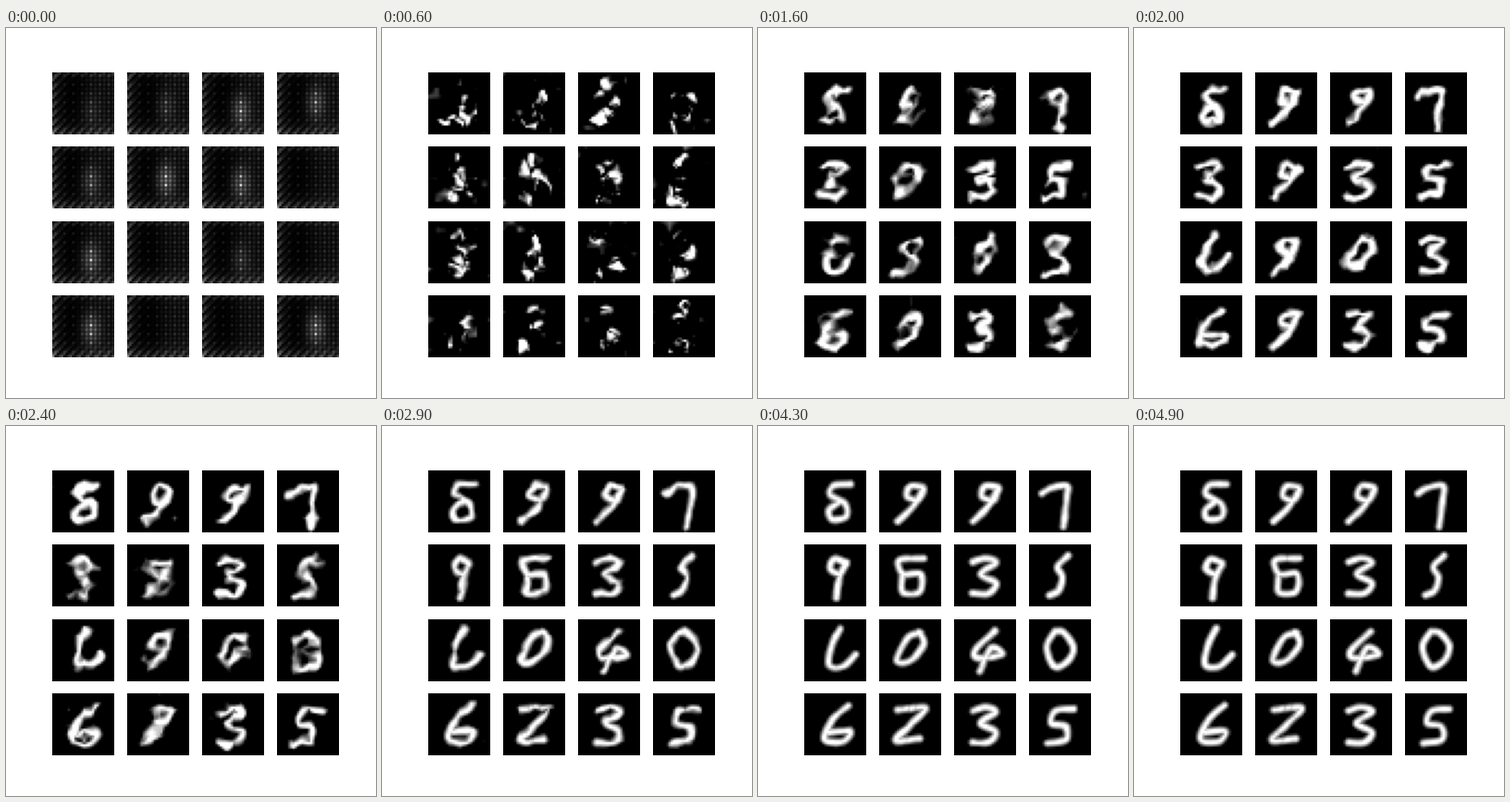
Animation of 400x400 px, one loop 5100 ms. Source, as a matplotlib script:

```python
import numpy as np
import matplotlib.pyplot as plt
from matplotlib.animation import FuncAnimation

SIZE, CELL = 28, 67
FRAMES, LAST = 51, 49
Y, X = np.mgrid[0:SIZE, 0:SIZE]
PX, PY = (X + 0.5) * CELL / SIZE, (Y + 0.5) * CELL / SIZE

# Key points of each handwritten form, joined by a smooth curve.
GLYPHS = {
    "0": [(28, 13), (19, 30), (28, 51), (42, 45), (48, 30), (38, 15), (28, 13)],
    "1": [(42, 12), (31, 24), (36, 36), (32, 50), (22, 55)],
    "3": [(20, 19), (34, 15), (45, 20), (29, 32), (45, 42), (37, 53), (20, 53)],
    "4": [(44, 13), (23, 33), (26, 42), (52, 38), (40, 31), (28, 56)],
    "5": [(48, 17), (29, 19), (24, 32), (39, 36), (40, 50), (20, 54)],
    "6": [(48, 13), (31, 28), (22, 50), (42, 52), (49, 41), (27, 42)],
    "7": [(14, 25), (24, 19), (41, 17), (40, 36), (37, 61)],
    "8": [(50, 15), (32, 16), (28, 26), (44, 36), (45, 50), (30, 53), (27, 43), (38, 34)],
    "9": [(47, 18), (34, 17), (30, 28), (42, 32), (48, 20), (36, 40), (20, 55)],
    "q": [(45, 20), (33, 16), (28, 26), (38, 32), (45, 22), (38, 36), (35, 58)],
    "B": [(48, 15), (22, 17), (26, 32), (45, 32), (44, 51), (26, 52), (25, 36)],
    "D": [(45, 15), (31, 20), (19, 44), (33, 45), (48, 27), (43, 14)],
    "L": [(39, 10), (30, 28), (27, 49), (42, 51), (56, 38)],
    "Z": [(20, 18), (50, 16), (34, 34), (18, 51), (44, 49)],
}
FORMS = {11: "5LBqZ035B515BD3L", 20: "89973935L9D36935",
         29: "8997qB31LD406Z35", LAST: "8997qB31LD406Z35"}
STAGES = [0, 6, *FORMS]


def smooth_curve(points, steps=12):
    """Catmull-Rom curve through the points."""
    p = np.array([points[0], *points, points[-1]], float)
    t = np.linspace(0, 1, steps)[:, None]
    return np.vstack([
        b + t * ((c - a) + t * ((2 * a - 5 * b + 4 * c - d) + t * (3 * b - a - 3 * c + d))) / 2
        for a, b, c, d in zip(p, p[1:], p[2:], p[3:])])


def distances(points, px, py):
    return np.hypot(px[..., None] - points[:, 0], py[..., None] - points[:, 1])


def untrained():
    """A dark lattice with bright left and bottom edges and a glowing column."""
    rng = np.random.default_rng(4)
    lattice = (0.35 + 0.65 * (X % 2)) * (0.5 + 0.5 * (Y % 2))
    dots = (X % 4 == 1) & (Y % 4 == 1)
    edge = np.exp(-X / 2.5) + np.exp((Y - 27) / 2.5) + 0.5 * np.exp(-Y / 1.2)
    slashes = ((X + Y) % 4) / 3
    base = 0.1 * dots + 0.3 * edge * slashes + 0.13 * lattice / (1 + np.exp((15 - X) / 2))
    glow = np.array([.3, .4, .8, .7, .6, .9, .8, 0, .8, 0, .4, 0, .8, 0, 0, .8])
    images = []
    for g in glow:
        middle = rng.uniform(13, 17)
        column = g * np.exp(-((X - 17) / 4) ** 2 - ((Y - middle) / 7) ** 2)
        images.append(base + column * (0.12 + 0.38 * lattice + 0.5 * dots * (X == 17)))
    return np.array(images)


def lattice_blobs():
    """Blobs of random radius where the first bright spots condense."""
    rng = np.random.default_rng(12)
    columns = {23: (22, 52, 58), 32: (14, 34, 44, 56), 41: (29, 37, 49)}
    spots = np.array([(x, y) for x, ys in columns.items() for y in ys])
    radii = rng.uniform(-3, 5.5, (16, len(spots)))
    radii[:, spots[:, 1] > 48] += 0.8
    return spots, radii


UNTRAINED = untrained()
SPOTS, RADII = lattice_blobs()
CURVES = {name: smooth_curve(points) for name, points in GLYPHS.items()}
SMOOTH = np.clip(1 - abs(np.arange(SIZE)[:, None] / 3.5 - np.arange(9)), 0, 1)


def noise(frame, hold=3):
    """Smooth noise that drifts from one seeded state to the next."""
    k, t = frame // hold, frame % hold / hold
    a, b = (np.random.default_rng(i).normal(size=(3, 16, 9, 9)) for i in (k, k + 1))
    return SMOOTH @ ((1 - t) * a + t * b) @ SMOOTH.T


def draw(stage, cell, px, py, early):
    """Signed brightness of one cell; early forms are smaller and lower."""
    if stage == 0:
        return UNTRAINED[cell]
    if stage == 6:
        reach = (RADII[cell] - distances(SPOTS, px, py)).max(axis=-1)
        return np.clip(0.5 + reach / 4, -0.5, 1.3)
    scale = 1 - 0.14 * early
    px = (px - 34 + 4 * early) / scale + 34
    py = (py - 35 - 4 * early) / scale + 35
    gap = distances(CURVES[FORMS[stage][cell]], px, py).min(axis=-1)
    return np.clip(0.5 + (3.5 + early - gap) / 4.5, -0.5, 1.3)


def generate(frame):
    frame = min(frame, LAST)
    start = max(s for s in STAGES[:-1] if s <= frame)
    end = STAGES[STAGES.index(start) + 1]
    t = (frame - start) / (end - start)
    early = np.clip((29 - frame) / 18, 0, 1)
    rough = (1 - frame / LAST) ** 1.5 * min(frame / 6, 1)
    shift_x, shift_y, grain = noise(frame)
    images = []
    for cell in range(16):
        px = PX + 6 * rough * shift_x[cell]
        py = PY + 6 * rough * shift_y[cell]
        field = (1 - t) * draw(start, cell, px, py, early) + t * draw(end, cell, px, py, early)
        grain_level = (0.1 + 0.4 * rough) * min(frame / 6, 1)
        images.append(np.clip(field + grain_level * grain[cell], 0, 1))
    return images


fig, axes = plt.subplots(4, 4, figsize=(4, 4), dpi=100)
pictures = []
for ax in axes.flat:
    ax.axis("off")
    pictures.append(ax.imshow(np.zeros((SIZE, SIZE)), cmap="gray", vmin=0, vmax=1))


def update(frame):
    for picture, image in zip(pictures, generate(frame)):
        picture.set_data(image)
    return pictures


anim = FuncAnimation(fig, update, frames=FRAMES, interval=100, repeat=True)
plt.show()
```
